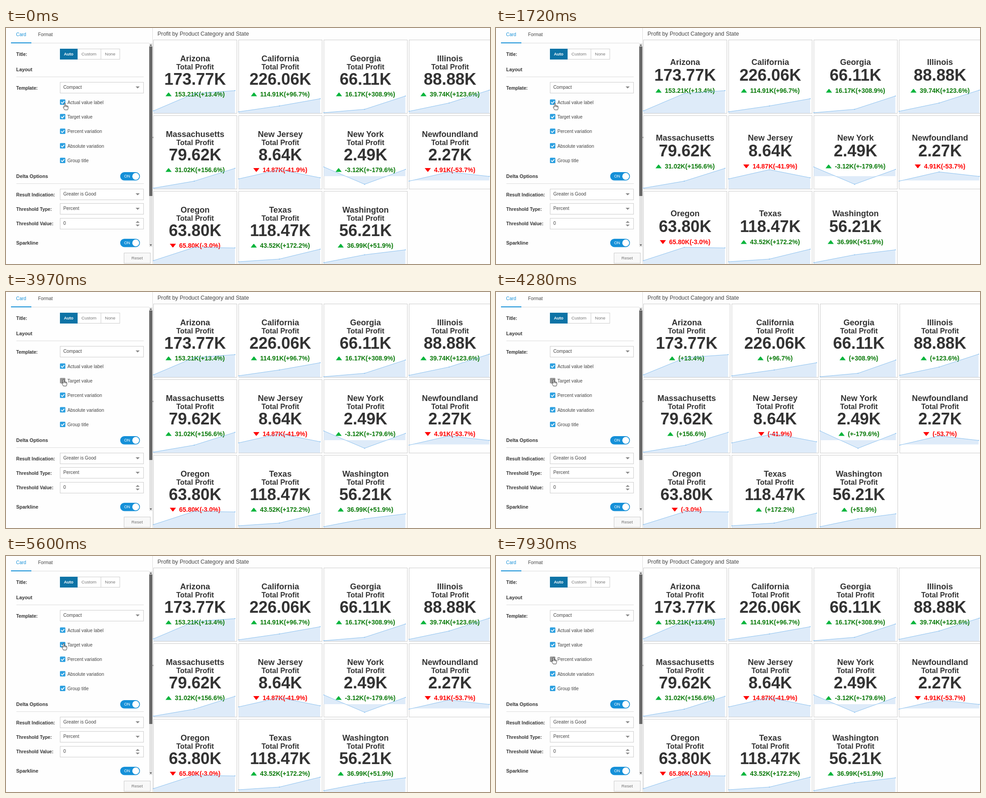
Write an HTML page that moves like this. It is 1068x524 px and loops after 8 s.

```html
<!DOCTYPE html>
<html lang="en">
<head>
<meta charset="utf-8">
<title>Card settings</title>
<style>
  html, body { margin: 0; width: 100%; height: 100%; overflow: hidden; background: #fefefe; }
  svg { display: block; width: 1068px; height: 524px; }
  text { font-family: "Liberation Sans", Arial, sans-serif; font-size: 10.2px; fill: #444; white-space: pre; }
  .b { font-weight: bold; fill: #333; }
  .head { font-size: 10.8px; }
  .btn { font-size: 9.6px; fill: #777; }
  .mid { text-anchor: middle; }
  .name { font-size: 18px; }
  .label { font-size: 16px; }
  .value { font-size: 36px; }
  .delta { font-size: 14px; }
</style>
</head>
<body>
<svg id="stage" viewBox="0 0 1068 524"></svg>
<script>
const LOOP = 8000;
const BLUE = '#1590d8';
const stage = document.getElementById('stage');

function el(tag, attrs, parent = stage) {
  const node = document.createElementNS('http://www.w3.org/2000/svg', tag);
  for (const key in attrs) node.setAttribute(key, attrs[key]);
  parent.appendChild(node);
  return node;
}
function text(str, x, y, cls = '', parent = stage, extra = {}) {
  const node = el('text', { x, y, class: cls, ...extra }, parent);
  node.textContent = str;
  return node;
}
const rect = (x, y, width, height, extra, parent) =>
  el('rect', { x, y, width, height, ...extra }, parent);
const path = (d, extra, parent) => el('path', { d, ...extra }, parent);
const rule = (x1, x2, y, color = '#dcdcdc') => rect(x1, y, x2 - x1, 1, { fill: color });

// Settings panel

function select(y, value) {
  rect(119.5, y + .5, 184, 24, { fill: '#fff', stroke: '#ccc' });
  text(value, 126.5, y + 15);
}
function caret(x, y, up = false, h = 4.5) {
  path(`M${x - 4.5} ${y}h9l-4.5 ${up ? -h : h}z`, { fill: '#888' });
}
function toggle(y) {
  rect(252, y - 9.3, 43.5, 18.6, { rx: 9.3, fill: BLUE });
  el('circle', { cx: 286.3, cy: y, r: 7.6, fill: '#fff' });
  text('ON', 267.3, y + 3, 'mid', stage, { style: 'font-size:8.8px;fill:#fff' });
}
function checkbox(label, i) {
  const y = 158.5 + i * 32.35;
  const box = rect(119, y, 12, 12, { rx: 1.5 });
  const tick = path(`M121.6 ${y + 6.2}l2.6 2.6 4.6-5`, { fill: 'none', stroke: '#fff', 'stroke-width': 1.7 });
  text(label, 135.4, y + 10.2);
  return on => {
    const mix = (a, b) => Math.round(a + (b - a) * on);
    box.setAttribute('fill', `rgb(${mix(150, 45)},${mix(150, 160)},${mix(150, 224)})`);
    tick.setAttribute('opacity', on);
  };
}

text('Card', 22.3, 17.5, '', stage, { style: `fill:${BLUE}` });
text('Format', 70.8, 17.5);
rule(11, 316, 33);
rect(11, 32, 45, 2, { fill: BLUE });

text('Title:', 22.6, 61.5, 'b');
rect(119.5, 46.5, 131.5, 23, { fill: '#fff', stroke: '#ccc' });
rect(209, 47, 1, 22, { fill: '#ccc' });
rect(119, 46, 39, 24, { fill: '#0d73a6' });
text('Auto', 138.2, 60.5, 'b mid', stage, { style: 'font-size:9.2px;fill:#fff' });
text('Custom', 183, 60.5, 'btn mid');
text('None', 229.8, 60.5, 'btn mid');

text('Layout', 22.6, 96, 'b head');
rule(23, 304, 108);
text('Template:', 22.6, 136.5, 'b');
select(120, 'Compact');
caret(290.5, 129.8);

const boxes = ['Actual value label', 'Target value', 'Percent variation', 'Absolute variation', 'Group title'].map(checkbox);

text('Delta Options', 22.6, 333, 'b head');
toggle(329.3);
rule(23, 304, 345);
[['Result Indication:', 'Greater is Good'], ['Threshold Type:', 'Percent'], ['Threshold Value:', '0']].forEach(([label, value], i) => {
  const y = 357 + i * 32.3;
  text(label, 22.6, y + 16.6, 'b');
  select(Math.round(y), value);
  if (i < 2) caret(290.5, y + 10);
});
caret(290.5, 432.5, true, 4);
caret(290.5, 436.5, false, 4);
text('Sparkline', 22.6, 481, 'b head');
toggle(477.2);

rect(260.5, 499.5, 58, 23, { fill: '#f8f8f8', stroke: '#ccc' });
text('Reset', 289.3, 514, 'btn mid');

rect(316, 34, 7, 452, { fill: '#e4e4e4' });
rect(316, 41, 7, 332, { fill: '#696969' });
path('M317 39.5h5l-2.5-3.5zM317 480.5h5l-2.5 3.5z', { fill: '#555' });
rect(323, 0, 1, 524, { fill: '#ddd' });
path('M327.5 239v8l-4.5-4z', { fill: '#888' });

// Dashboard

text('Profit by Product Category and State', 334.3, 17, '', stage, { style: 'font-size:12.4px;fill:#444' });

// name, value, target, variation, sparkline heights, optional zero line
const cards = [
  ['Arizona', '173.77K', '153.21K', '+13.4%', [184, 145.5, 139]],
  ['California', '226.06K', '114.91K', '+96.7%', [186, 173, 157]],
  ['Georgia', '66.11K', '16.17K', '+308.9%', [188, 180.5, 151]],
  ['Illinois', '88.88K', '39.74K', '+123.6%', [185, 166.5, 138]],
  ['Massachusetts', '79.62K', '31.02K', '+156.6%', [355.5, 340, 311.5]],
  ['New Jersey', '8.64K', '14.87K', '-41.9%', [335, 314.5, 332.5]],
  ['New York', '2.49K', '-3.12K', '+-179.6%', [308.5, 347, 314], 329],
  ['Newfoundland', '2.27K', '4.91K', '-53.7%', [340, 319.5, 329.5], 338.5],
  ['Oregon', '63.80K', '65.80K', '-3.0%', [516.5, 487, 488.3]],
  ['Texas', '118.47K', '43.52K', '+172.2%', [519, 513, 491]],
  ['Washington', '56.21K', '36.99K', '+51.9%', [521, 503.5, 492.5]]
];
const wide = [[325, 185], [513, 185], [701, 185], [889, 182]];
const narrow = [[325, 192], [520, 192], [715, 172], [890.5, 179]];

function drawCard(parent, [name, value, target, change, heights, zero], [x, w], row, showLabel, showTarget) {
  const top = 26 + row * 168;
  const mid = x + w / 2 - .2;
  const base = zero || top + 163;
  const pts = heights.map((y, i) => [x + .3 + i * (w - 5) / 2, y]);
  const line = 'M' + pts.join('L');
  rect(x + .5, top + .5, w - 1, 163, { fill: '#fff', stroke: '#ccc' }, parent);
  path(`${line}V${base}H${x + .3}z`, { fill: '#deebf9' }, parent);

  const shift = showLabel ? 0 : 8;
  text(name, mid, top + 48 + shift, 'b mid name', parent);
  if (showLabel) text('Total Profit', mid, top + 66, 'b mid label', parent);
  text(value, mid, top + 100 - (shift && 9), 'b mid value', parent);

  const up = change[0] === '+';
  const y = top + 126 - shift;
  const delta = text(`${showTarget ? target : ''}(${change})`, 0, y, 'b delta', parent,
    { style: `fill:${up ? '#0a7a0a' : '#f00'}` });
  const left = mid - (delta.getComputedTextLength() + 20.5) / 2;
  delta.setAttribute('x', left + 20.5);
  path(up ? `M${left} ${y - .5}h13.5l-6-8h-1.5z` : `M${left} ${y - 9}h13.5l-6 8h-1.5z`,
    { fill: up ? '#08b53c' : '#f00' }, parent);

  path(line, { fill: 'none', stroke: '#80bbee', 'stroke-width': .9 }, parent);
  pts.forEach(([cx, cy]) => el('circle', { cx, cy, r: 1, fill: '#80bbee' }, parent));
}
function board(cols, showLabel, showTarget) {
  const group = el('g', {});
  cards.forEach((card, i) => drawCard(group, card, cols[i % 4], Math.floor(i / 4), showLabel, showTarget));
  return group;
}
const boards = { full: board(wide, true, true), noLabel: board(wide, false, true), noTarget: board(narrow, true, false) };

const hand = path('M-1.5 9V1.2Q-1.5 0-.2 0Q1 0 1 1.2V5.2Q2.2 4.6 3 5.6Q4.2 5 5 6.1Q6.8 5.8 6.8 7.6V10.5Q6.8 12.5 5.5 14.8H-.8Q-3 11.5-4 9.2Q-4.3 7.8-3 7.9Q-2.2 8-1.5 9zM1 5v3.2M3.1 5.8v2.6M5 6.3v2.4',
  { fill: '#fff', stroke: '#222', 'stroke-width': .9, 'stroke-linejoin': 'round' });

// Timeline

// Progress in n hard steps, the first at `from` and the last at `to`
function steps(t, from, to, n) {
  if (t < from) return 0;
  if (t >= to) return 1;
  return (Math.floor((t - from) / (to - from) * (n - 1) + 1e-6) + 1) / n;
}
const ease = p => p * p * (3 - 2 * p);

function cursorAt(t) {
  const a = ease(steps(t, 2810, 3350, 8));
  const b = ease(steps(t, 6380, 6840, 7));
  const nudge = t >= 7230 ? 3 : t >= 7080 ? 1 : t >= 7000 ? -1 : 0;
  return [130.3 - 2.8 * a - .5 * b + 11 * Math.sin(Math.PI * b), 167 + 27 * a + 28 * b + nudge];
}

function render(t) {
  boxes[0](1 - steps(t, 230, 390, 3) + steps(t, 1560, 1720, 2));
  boxes[1](1 - steps(t, 3820, 3970, 2) + steps(t, 5210, 5290, 2));
  boxes[2](1 - steps(t, 7770, 7930, 3));
  boxes[3](1);
  boxes[4](1);

  const shown = t >= 700 && t < 2030 ? 'noLabel' : t >= 4280 && t < 5600 ? 'noTarget' : 'full';
  for (const key in boards) boards[key].setAttribute('display', key === shown ? 'inline' : 'none');

  hand.setAttribute('transform', `translate(${cursorAt(t)})`);
}

const start = performance.now();
function tick() {
  render((performance.now() - start) % LOOP);
  requestAnimationFrame(tick);
}
tick();
</script>
</body>
</html>
```
